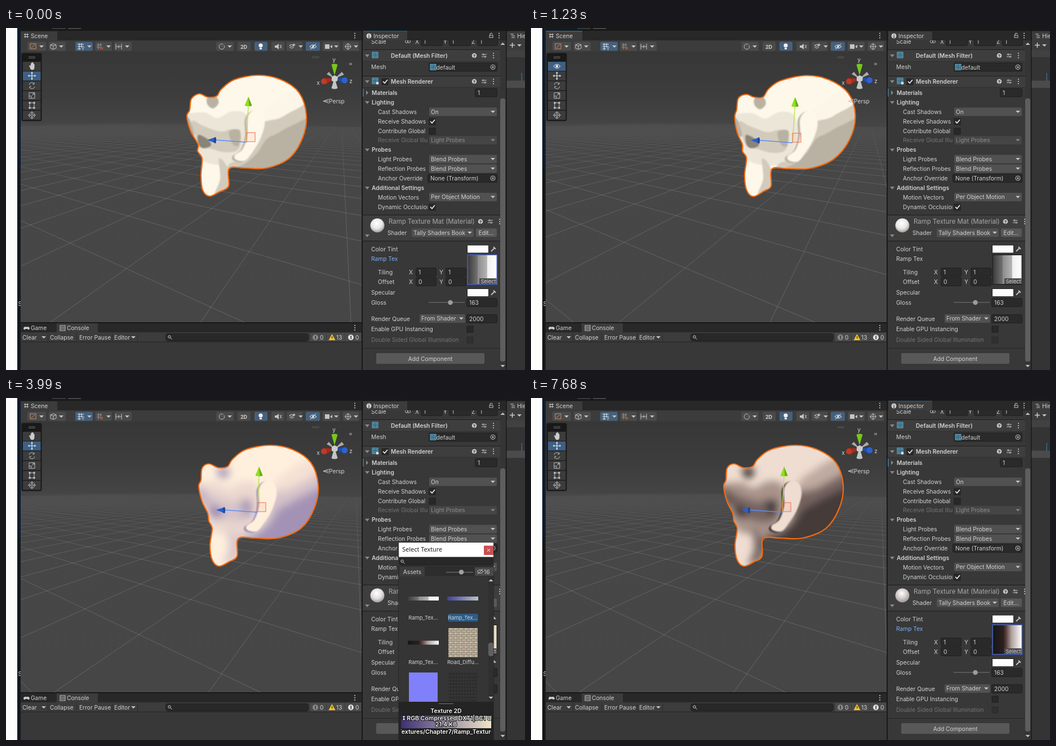
Write an HTML page that moves like this. It is 921 px wide and 608 px high and loops after 8000 ms.

```html
<!DOCTYPE html>
<html lang="en">
<head>
<meta charset="utf-8">
<title>Ramp texture editor</title>
<style>
html,body{margin:0;width:100%;height:100%;overflow:hidden;background:#282828}
svg{display:block;width:921px;height:608px}
text{font-family:Inter,sans-serif;font-size:10.2px;fill:#d2d2d2;white-space:pre}
</style>
</head>
<body>
<svg id="stage" viewBox="0 0 921 608" xmlns="http://www.w3.org/2000/svg"></svg>
<script>
const $ = id => document.getElementById(id);
const rect = (x, y, w, h, fill, more = '') => `<rect x="${x}" y="${y}" width="${w}" height="${h}" fill="${fill}" ${more}/>`;
const text = (x, y, s, more = '') => `<text x="${x}" y="${y + 3.8}" ${more}>${s}</text>`;
const path = (d, color = '#c4c4c4', more = '') => `<path d="${d}" fill="none" stroke="${color}" ${more}/>`;
const solid = (d, color = '#c4c4c4', more = '') => `<path d="${d}" fill="${color}" ${more}/>`;
const circle = (x, y, r, fill, more = '') => `<circle cx="${x}" cy="${y}" r="${r}" fill="${fill}" ${more}/>`;
const down = (x, y) => solid(`M${x - 4} ${y - 2}h8l-4 4z`);
const up = (x, y) => solid(`M${x - 4} ${y + 2}h8l-4-4z`);
const right = (x, y) => solid(`M${x - 2} ${y - 4}v8l4-4z`, '#888');
const fold = (x, y) => solid(`M${x - 4} ${y - 2}h8l-4 5z`, '#888');
const dots = (x, y) => [-4, 0, 4].map(d => circle(x, y + d, 1.1, '#c4c4c4')).join('');
const bold = 'font-weight="600"', dim = 'style="fill:#747474"', mid = 'text-anchor="middle"';
const field = (x, y, w, s) => rect(x + .5, y - 7.5, w, 15, '#2a2a2a', 'stroke="#202020" rx="2"') + text(x + 5, y + .5, s);
const drop = (x, y, w, s, more = '') => rect(x, y - 7.5, w, 15, '#515151', 'rx="2"') + text(x + 3, y, s, more) + down(x + w - 7, y);
const box = (x, y, on) => rect(x - 5, y - 5, 11, 11, '#292929', 'stroke="#1e1e1e"') + (on ? path(`M${x - 3} ${y}l3 3l5-6`, '#f0f0f0', 'stroke-width="1.7"') : '');
const target = (x, y) => circle(x, y, 4, 'none', 'stroke="#c4c4c4"') + circle(x, y, 1.5, '#c4c4c4');
const meshIcon = (x, y) => rect(x - 5, y - 5, 10, 10, '#27566b', 'stroke="#6fb3d2"') + path(`M${x - 5} ${y - 2}h10m-10 4h10m-7-7v10m4-10v10`, '#6fb3d2', 'stroke-width=".8"');
const help = (x, y) => circle(x, y, 4.3, '#c8c8c8') + text(x, y - .3, '?', mid + ' font-weight="700" style="fill:#333;font-size:8px"') +
  path(`M${x + 13} ${y - 2}h9m-9 4h9m-6-6v4m3 0v4`) + dots(x + 34, y);
const lens = (x, y) => circle(x, y - 1, 2.2, 'none', 'stroke="#d0d0d0"') + path(`M${x + 2} ${y + 1}l2.5 2.5`, '#d0d0d0');
const stops = list => list.map(([o, c]) => `<stop offset="${o}" stop-color="${c}"/>`).join('');
const ramps = [
  [[0, '#3c3c3c'], [.34, '#747474'], [.34, '#8c8c8c'], [.66, '#b4b4b4'], [.68, '#f0f0f0'], [1, '#fff']],
  [[0, '#3f2f78'], [.5, '#988ba5'], [1, '#efe5c8']],
  [[0, '#161616'], [.36, '#2b2020'], [.46, '#5b3f3c'], [.65, '#b0a3a1'], [1, '#fff']]
];
const tones = [
  {lit: '#fdf8ea', haze: '#fbf6e8', half: '#ece6d8', mid: '#d2cbbc', low: '#b9b2a3', dark: '#8a8478', blur: .8, ball: '#e8e6e4'},
  {lit: '#fff0dd', haze: '#f5e1d4', half: '#ecd8cf', mid: '#d5c3c9', low: '#a392b5', dark: '#8373a6', blur: 8, ball: '#e2dcdf'},
  {lit: '#efddd1', haze: '#bfaaa0', half: '#a8938a', mid: '#756460', low: '#443a39', dark: '#3f3536', blur: 7, ball: '#cfc5c4'}
];

function defs() {
  return `<defs>
  <linearGradient id="sky" x2="0" y2="1">${stops([[0, '#373737'], [.16, '#3d3d3d'], [.3, '#474747'], [1, '#464646']])}</linearGradient>
  <linearGradient id="fade" gradientUnits="userSpaceOnUse" x1="0" y1="160" x2="0" y2="523">
  <stop offset=".02" stop-color="#fff" stop-opacity="0"/><stop offset=".1" stop-color="#fff" stop-opacity=".05"/><stop offset=".35" stop-color="#fff" stop-opacity=".14"/><stop offset="1" stop-color="#fff" stop-opacity=".17"/></linearGradient>
  <radialGradient id="ball" cx=".45" cy=".35" r=".7"><stop offset="0" stop-color="#fff"/><stop id="ballMid" offset=".55"/><stop offset="1" stop-color="#8f8d8d"/></radialGradient>
  ${ramps.map((r, i) => `<linearGradient id="ramp${i}">${stops(r)}</linearGradient>`).join('')}
  <pattern id="stone" width="9" height="8" patternUnits="userSpaceOnUse">${rect(0, 0, 9, 8, '#b9ad9a') + path('M0 .5h9M0 4.5h9M3 0v4M7 4v4', '#8d8171', 'stroke-width=".9"') + rect(4, 1, 3, 3, '#cdc2af')}</pattern>
  <pattern id="coal" width="5" height="6" patternUnits="userSpaceOnUse">${rect(0, 0, 5, 6, '#303030') + rect(1, 1, 2, 1, '#454545') + rect(3, 4, 1, 1, '#222')}</pattern>
  <filter id="soft" x="-20%" y="-20%" width="140%" height="140%"><feGaussianBlur id="blur" stdDeviation=".8"/></filter>
  <filter id="edge"><feGaussianBlur stdDeviation="1.2"/></filter>
  <clipPath id="view"><rect x="26" y="42" width="605" height="481"/></clipPath>
  <clipPath id="labels"><rect x="636" y="22" width="112" height="586"/></clipPath>
  <clipPath id="body"><rect x="633" y="22" width="244" height="586"/></clipPath>
  <clipPath id="info"><rect x="701" y="541" width="160" height="67"/></clipPath>
  <clipPath id="skin"><path id="skinPath"/></clipPath></defs>`;
}

function toolbar() {
  const on = '#46607c', off = '#4a4a4a';
  const buttons = [[38, 33, off], [76, 30, off], [123, 31, on], [158, 30, off], [192, 31, off], [373, 31, off], [411, 23, off], [441, 23, on], [471, 23, off], [498, 28, off], [532, 25, on], [562, 30, off], [598, 28, off]];
  return rect(26, 22, 605, 20, '#3c3c3c') + buttons.map(([x, w, c]) => rect(x, 24.5, w, 16, c, 'rx="2"')).join('') +
    [63, 98, 148, 182, 215, 397, 523, 586, 621].map(x => down(x, 33)).join('') +
    rect(43, 28, 10, 9, 'none', 'stroke="#c98d6b"') + path('M45 35l6-5', '#c98d6b') +
    path('M84 28l5 2v6l-5 2l-5-2v-6zM79 30l5 2l5-2M84 32v6') +
    path('M127 29h11m-11 4h11m-11 4h6m-3-10v12m4-12v7', '#dfe7ef') + text(134, 36, 'Y', 'style="font-size:8px"') +
    path('M161 30h9m-9 4h9m-6-7v11m4-11v5', '#999') + rect(167, 34, 5, 4, '#9a5440') +
    path('M195 28v10M205 28v10M195 33h10M200 30v6') +
    circle(383, 33, 4.8, 'none', 'stroke="#c4c4c4"') + circle(384.5, 31.5, 3, '#555') + text(422, 33, '2D', mid + ' style="font-size:9px;font-weight:700"') +
    circle(452, 31, 3.6, '#f2f2f2') + rect(450, 35, 4, 3, '#f2f2f2') +
    solid('M477 31h3l4-3v10l-4-3h-3z') + path('M486 30l3 6m0-6l-3 6') +
    path('M503 31l4-2l4 2l-4 2zM503 34l4 2l4-2', '#ccc') + solid('M511 27l1 2l2 1l-2 1l-1 2l-1-2l-2-1l2-1z') +
    path('M539 33q6-6 12 0q-6 6-12 0M540 38l10-10', '#eee') + circle(545, 33, 1.8, '#eee') +
    rect(566, 29, 8, 8, '#c4c4c4') + solid('M575 33l4-3v6z') +
    circle(607, 33, 4.5, 'none', 'stroke="#c4c4c4"') + path('M607 27v12m-6-6h12');
}

function tools() {
  const y = [68, 85.2, 102.6, 120, 137.5, 155];
  return rect(27.5, 44.5, 36, 121, '#191919', 'rx="3"') + path('M40 51h12m-12 2.5h12', '#666') +
    y.map((v, i) => rect(30, v - 8, 31.5, 16.2, '#3c3c3c', `id="tool${i}"`)).join('') +
    `<g id="hand">${solid('M41 67l2-1l1 2v-5q1-1 1.6 0v-2q1-1 1.7 0v1q1-1 1.6 0v2q1-.6 1.6.4v5q0 5-4 5q-3 0-4-4z', '#ccc')}</g>` +
    `<g id="eye">${path('M40 68q6-7 12 0q-6 7-12 0', '#eee') + circle(46, 68, 2.2, '#eee')}</g>` +
    path('M40 85h12M46 79v12', '#dfe7ef', 'stroke-width="1.2"') + solid('M38.5 85l3-2v4zM53.5 85l-3-2v4zM46 77.5l-2 3h4zM46 92.5l-2-3h4z', '#dfe7ef') +
    path('M41 101a5 5 0 0 1 9-2m1 5a5 5 0 0 1-9 2m8-9v3h-3m-5 7v-3h3', '#bbb') +
    path('M41 115h10v10h-10zM41 121h4v4M46 120l4-4m-3 0h3v3', '#bbb') +
    path('M42 133h8v9h-8z', '#bbb') + [41, 49].map(x => [132, 141].map(v => rect(x - .5, v - .5, 3, 3, '#ccc')).join('')).join('') +
    circle(46, 155, 5, 'none', 'stroke="#bbb"') + path('M46 148v14m-7-7h14', '#bbb') + circle(46, 155, 2, '#3c3c3c', 'stroke="#bbb"');
}

function compass() {
  return path('M543 51h13m-13 2h13', '#555') + path('M609 63h5m-5 2h5', '#aaa') +
    solid('M583 90l-14-8l4-4zM583 90l13-12l4 5z', '#a8aaab') + solid('M583 88l-5.5 19q5.5 3 11 0z', '#c3c5c6') +
    solid('M583 84L577.5 65q5.5-3 11 0z', '#76c81b') + '<g id="axisX">' + solid('M583 90l-21-1l4 12z', '#a92c1c') + circle(564, 95, 5, '#bf3c27') + '</g><g id="axisZ">' +
    solid('M583 90l20-3l-3 12z', '#204ea8') + circle(601, 93, 5.2, '#2d62cf') + '</g>' + solid('M578 87l5-3l6 3l-1 7l-5 2l-5-2z', '#c9cccd') +
    text(582, 56, 'y', mid) + text(554, 97, 'x', mid + ' id="nameX"') + text(612, 94, 'z', mid) +
    path('M573 126.5l-10 3.5l10 3.5M563 130h10', '#c8c8c8') + text(573, 130, 'Persp');
}

function inspector() {
  const labels = [[660, 149, 'Cast Shadows'], [660, 166, 'Receive Shadows'], [660, 183, 'Contribute Global'], [660, 199.5, 'Receive Global Illumination', dim],
    [660, 233, 'Light Probes'], [660, 250, 'Reflection Probes'], [660, 267, 'Anchor Override'], [660, 301, 'Motion Vectors'], [660, 318, 'Dynamic Occlusion'], [648, 24, 'Scale'], [648, 69.5, 'Mesh']];
  const frame = rect(633, 5, 254, 17, '#282828') + rect(634, 6, 78, 17, '#3c3c3c') + rect(633, 22, 254, 586, '#383838') +
    circle(644, 14, 4.5, '#ccc') + text(644, 14, 'i', mid + ' style="fill:#333;font-weight:700;font-size:8px"') + text(652, 14, 'Inspector') +
    rect(858, 13, 6, 4, 'none', 'stroke="#c4c4c4"') + path('M859 13v-3q2-2 4 0v1') + dots(875, 13.5) + rect(634, 5, 78, 1, '#2c5d87', 'id="focusB"');
  let b = ['X', 'Y', 'Z'].map((a, i) => text(726 + i * 50, 24, a) + field(736 + i * 50, 24, i < 2 ? 38 : 36, '1')).join('') +
    circle(711, 24, 2.5, 'none', 'stroke="#bbb"') + circle(715, 24, 2.5, 'none', 'stroke="#bbb"');
  for (const [y, h] of [[38, 21], [85, 20]]) b += rect(633, y, 244, h, '#3e3e3e') + rect(633, y, 244, 1, '#1f1f1f') + rect(633, y + h, 244, 1, '#303030');
  b += fold(641, 49) + meshIcon(655, 48) + text(683, 49, 'Default (Mesh Filter)', bold) + help(831, 49) +
    field(750, 69.5, 121, '   default') + meshIcon(758, 69.5) + target(864, 69.5) +
    fold(641, 95) + meshIcon(655, 94) + circle(659, 98, 2.5, '#cfdce2') + box(672, 95, 1) + text(683, 95, 'Mesh Renderer', bold) + help(831, 95) +
    rect(633, 108, 1.5, 14, '#3c83ad') + right(641, 115) + field(832, 115, 39, '1');
  for (const [y, n] of [[115, 'Materials'], [132, 'Lighting'], [216.5, 'Probes'], [284, 'Additional Settings']]) b += (y > 115 ? fold(641, y) : '') + text(649, y, n, bold);
  b += drop(751, 149, 120, 'On') + box(756, 166, 1) + box(756, 183) + `<g opacity=".55">${drop(751, 199.5, 120, 'Light Probes')}</g>` +
    drop(751, 233, 120, 'Blend Probes') + drop(751, 250, 120, 'Blend Probes') + field(748, 267, 123, 'None (Transform)') + target(864, 267) +
    drop(751, 300.5, 120, 'Per Object Motion') + box(756, 318, 1) +
    rect(633, 332, 244, 46, '#3e3e3e') + rect(633, 332, 244, 1, '#1d1d1d') + rect(633, 378, 244, 1.5, '#252525') + circle(659, 351, 12.5, 'url(#ball)') + fold(641, 369) +
    text(679, 344, 'Ramp Texture Mat (Material)', 'style="font-size:11.4px;fill:#aaa"') + help(842, 344) + text(677, 364, 'Shader') + drop(720, 364, 110, 'Tally Shaders Book') +
    rect(834, 356.5, 37, 15, '#585858', 'rx="2"') + text(852, 364, 'Edit...', mid) +
    text(648, 393.5, 'Color Tint') + text(648, 410.5, 'Ramp Tex', 'id="rampName"') + text(660, 434, 'Tiling') + text(660, 451, 'Offset');
  for (const y of [393, 470.5]) b += rect(818.5, y - 7, 38, 14, '#fdfdfd', 'stroke="#222"') + path(`M861 ${y + 4}l6-6m-2-2l4 4`, '#c4c4c4', 'stroke-width="1.8"');
  [434, 451].forEach((y, i) => { b += text(715, y, 'X') + field(727, y, 36, 1 - i) + text(769, y, 'Y') + field(780, y, 36, 1 - i); });
  b += rect(818.5, 402.5, 53.5, 54, '#222', 'id="thumbEdge"') + rect(820, 404, 50.5, 51, 'url(#ramp0)', 'id="thumb"') + rect(840, 445, 30.5, 10, '#4b4b4b') + text(856, 450.5, 'Select', mid + ' style="font-size:9.2px"') +
    text(648, 470.5, 'Specular') + text(648, 488, 'Gloss') + rect(750, 487, 64, 1.5, '#626262') + circle(788.5, 488, 4.3, '#9c9c9c') + field(817, 488, 54, '163') +
    text(648, 517, 'Render Queue') + drop(734, 516.5, 81, 'From Shader') + field(817, 517, 54, '2000') + text(648, 535, 'Enable GPU Instancing') + box(823, 535) +
    text(648, 554, 'Double Sided Global Illumination', dim) + `<g opacity=".5">${box(823, 554)}</g>` + rect(633, 569, 244, 1, '#262626') +
    rect(657, 578, 192, 19, '#585858', 'rx="2"') + text(753, 588, 'Add Component', mid);
  return frame + `<g clip-path="url(#body)">${b}</g><g clip-path="url(#labels)">${labels.map(a => text(...a)).join('')}</g>` +
    rect(877, 22, 10, 586, '#353535') + rect(877, 125, 9, 468, '#5e5e5e', 'rx="4"') + up(881.5, 28) + down(881.5, 601) + rect(887, 0, 1.5, 608, '#191919');
}

function picker() {
  const small = 'style="font-size:9.3px"';
  const thumb = (i, x, y) => rect(x - 27.5, y - 3.5, 55, 7, `url(#ramp${i})`) + rect(x - 27.5, y - 3.5, 55, 7, '#3e6fd0', `id="tint${i}" opacity=".3"`) +
    rect(x - 26, y + 27, 53, 14, '#2c5d87', `id="pick${i}" rx="2"`) + text(x, y + 34, 'Ramp_Tex...', mid + ' ' + small);
  const info = (y, s, x = 781, anchor = mid) => text(x, y, s, anchor + ' style="font-size:10.5px;font-weight:600;fill:#fff;stroke:#111;stroke-width:2px;paint-order:stroke"');
  return rect(696, 256, 170, 360, '#222', 'opacity=".6"') + rect(697, 257, 168, 351, '#353535') + rect(697, 257, 168, 25.5, '#fff') +
    text(703, 269.5, 'Select Texture', 'style="font-family:\'Open Sans\',sans-serif;font-size:11px;fill:#111"') + rect(848, 262.5, 17, 16.5, '#c75050', 'id="close"') + path('M854 268l5 5m0-5l-5 5', '#fff') +
    rect(698.5, 284, 165, 13, '#282828', 'id="search" rx="3"') + lens(703, 291) + rect(710, 286, 1, 9, '#ddd', 'id="caret"') +
    rect(697, 299, 168, 17.5, '#2d2d2d') + rect(698, 300, 45, 17, '#3c3c3c') + text(721, 309.5, 'Assets', mid) + rect(781, 309, 48, 1.5, '#666') + circle(808, 309.5, 4.3, '#a0a0a0') +
    rect(832, 301, 33, 15, '#4a4a4a') + path('M836 308.5q5-6 11 0q-5 6-11 0M837 313l9-9', '#ccc') + text(848, 309, '16') +
    rect(856, 317, 9, 223, '#303030') + rect(856, 435, 9, 24, '#606060', 'rx="4"') + up(860.5, 324) + down(860.5, 533) +
    thumb(0, 740.5, 356.5) + thumb(1, 810.5, 356.5) + thumb(2, 740.5, 435) + rect(785, 409, 52, 52, 'url(#stone)') + text(811, 469.5, 'Road_Diffu...', mid + ' ' + small) +
    rect(715, 488, 51, 52, '#8080fb') + rect(785, 488, 52, 52, 'url(#coal)') +
    rect(697, 540, 168, 68, '#242424') + path('M768 543.5h26', '#777') + `<g clip-path="url(#info)">${rect(701, 565, 160, 22, 'url(#ramp0)', 'id="preview"')}${info(556, 'Texture 2D')}${info(569, '⭥ RGB Compressed DXT1|BC1 UNorm', 703, '')}${info(580.5, '21.4 KB')}${info(593, 'Textures/Chapter7/Ramp_Texture')}</g>`;
}

function build() {
  const shades = shapes.map((s, i) => `<path id="shade${i}"/>`).join('');
  $('stage').innerHTML = defs() + rect(0, 0, 921, 608, '#191919') + rect(0, 0, 20, 608, '#fdfefb') + rect(20, 0, 6, 608, '#0f1c2b') + rect(20, 250, 5, 358, '#151719') +
    text(21.5, 490, 'S') + rect(26, 5, 605, 17, '#282828') + rect(26, 6, 65, 17, '#3c3c3c') + rect(26, 5, 65, 1.3, '#35699c', 'id="focusA"') + rect(82, 0, 24, 1.5, '#444') + rect(110, 0, 23, 1.5, '#555') +
    path('M32 11.5h8m-8 4h8m-6-6v8m4-8v8', '#ccc') + text(44, 14, 'Scene') + dots(619, 13.5) + toolbar() +
    `<g clip-path="url(#view)">${rect(26, 42, 605, 481, 'url(#sky)')}<path id="grid" fill="none" stroke="url(#fade)"/>
    <path id="coat"/><g clip-path="url(#skin)"><g id="shades" filter="url(#soft)">${shades}</g><path id="earShade" filter="url(#edge)"/><path id="ear" filter="url(#edge)"/></g>
    <path id="rim" fill="none" stroke="#f5690f" stroke-width="2.2"/><g id="arrows"></g>${compass()}${tools()}</g>` +
    rect(26, 525, 605, 16, '#282828') + rect(90, 525, 73, 16, '#3c3c3c') + solid('M31 534q1-4 5.5-2.5q4.5-1.5 5.5 2.5q-1 4-4 1h-3q-3 3-4-1', '#ccc') + text(44, 533.5, 'Game') +
    rect(96, 529, 9, 9, 'none', 'stroke="#ccc"') + path('M97 532h7m-7 3h7', '#ccc') + text(108, 533.5, 'Console') + dots(619, 533) +
    rect(26, 541, 605, 17, '#3c3c3c') + rect(26, 558, 605, 50, '#383838') + rect(26, 557.5, 605, 1, '#232323') +
    [[29, 'Clear'], [78, 'Collapse'], [130, 'Error Pause'], [192, 'Editor']].map(([x, s]) => text(x, 550.5, s)).join('') + down(67, 550) + down(226, 550) +
    [74, 125, 188, 233].map(x => rect(x, 542, 1, 15, '#2b2b2b')).join('') + rect(283.5, 543.5, 253, 13, '#282828', 'rx="4" stroke="#202020"') + lens(290, 550) +
    rect(540, 542, 28, 15, '#4a4a4a') + circle(549, 550, 5, '#888') + rect(548.5, 547, 1.5, 6, '#333') + text(557, 550.5, '0') +
    rect(569, 542, 32, 15, '#4a4a4a') + solid('M578.5 544l6 11h-12z', '#f8c021') + rect(578, 548, 1.3, 4, '#333') + text(586, 550.5, '13') +
    rect(602, 542, 28, 15, '#4a4a4a') + circle(612, 550, 5, '#ddd') + rect(611.5, 547, 1.5, 6, '#333') + text(620, 550.5, '0') + inspector() +
    rect(888.5, 5, 33, 17, '#282828') + rect(889, 6, 33, 17, '#3c3c3c') + path('M895 11h6m-4 3h6m-6 3h6', '#ccc') + text(907, 14, 'Hierarchy') +
    rect(888.5, 22, 33, 18, '#3c3c3c') + path('M894 30.5h9m-4.5-4.5v9', '#ccc', 'stroke-width="1.5"') + down(911, 31) + rect(888.5, 40, 33, 568, '#343434') + rect(888.5, 40, 33, 12, '#414141') +
    rect(888.5, 93.5, 33, 13, '#4b4b4b') + rect(914.5, 80, 1.5, 14, '#2c6f8f') + `<g id="picker">${picker()}</g>`;
}

// Outline of the head in four camera poses, joined by a closed spline.
const shift = (a, dx, dy = 0) => a.map((v, i) => v + (i % 2 ? dy : dx));
const headA = [343,117,329,126,326,146,321,157,328,184,341,207,340,219,348,232,346,262,349,288,361,299,379,291,395,281,396,250,425,249,462,249,502,232,526,196,533,155,520,115,488,92,448,84,405,92,382,109,374,121,358,123];
const headB = [392,115,375,126,368,145,357,158,363,188,379,212,391,222,396,233,389,268,392,298,404,308,430,299,448,290,448,260,480,263,528,261,572,240,599,200,606,158,592,113,555,86,505,76,458,83,423,103,411,126,406,119];
const headC = [404,119,388,125,384,145,381,160,384,188,392,208,391,220,399,231,396,262,400,290,412,300,432,288,442,281,443,251,470,251,508,250,550,235,584,200,597,155,585,117,548,92,508,85,462,95,442,107,430,124,415,122];
const headD = [360,117,348,125,346,146,342,157,348,184,358,205,360,219,366,232,362,262,366,288,378,299,396,291,410,281,412,250,442,249,482,249,523,232,547,196,554,155,541,115,509,92,469,84,425,92,402,109,393,122,377,124];
const earA = [440,146,455,152,459,172,450,200,436,222,424,236,408,234,406,226,420,215,428,190,428,160];
const earB = [456,145,474,152,478,175,470,215,458,244,444,248,434,240,437,215,432,192,430,168,438,152];
const heads = [headA, headB, headC, headD], ears = [earA, earB, shift(earA, 78, 2), shift(earA, 21, 1)];
// tone, points, then the offset in each later pose
const shapes = [
  ['haze', [570,88,508,112,476,132,455,150,440,200,570,220], [66,-4], [66,0], [21,0]],
  ['half', [310,160,350,150,375,160,402,148,428,156,430,200,408,240,352,238,330,206], [34,0], [60,2], [20,0]],
  ['mid', [570,122,512,146,486,160,460,166,448,172,440,215,420,234,396,242,390,268,470,280,570,215], [66,-3], [66,0], [21,0]],
  ['low', [570,148,510,172,482,187,462,198,446,222,426,240,402,255,420,276,500,280,570,200], [66,2], [65,0], [21,0]],
  ['mid', [330,166,350,174,380,184,402,180,417,190,412,216,390,221,365,215,342,206], [28,-2], [58,2], [21,0]],
  ['dark', [341,190,357,197,364,208,352,214,342,208], [28,-8], [60,0], [21,0]],
  ['low', [396,184,415,182,413,208,402,206], [26,-6], [62,2], [21,0]],
  ['low', [358,123,373,122,377,134,367,143,357,135], [39,-1], [60,2], [19,1]],
  ['mid', [378,232,393,248,397,282,382,294,370,296,380,268], [51,8], [48,0], [16,0]],
  ['low', [318,157,327,164,334,190,326,188], [35,2], [60,2], [21,0]]
];
const rig = [ // yaw, origin, up tip, left tip, red reach
  [31.6, 427, 203, 430, 122, 357, 199, 0], [50, 480, 209, 484, 129, 413, 203, 32],
  [30, 482, 205, 488, 124, 407, 200, 0], [34, 446, 203, 449, 122, 373, 199, 0]];
const keys = [540, 810, 1080, 1380];

const mix = (a, b, u) => a.map((v, i) => v + (b[i] - v) * u);
function spline(p) {
  const n = p.length / 2, at = i => { i = (i + n) % n; return [p[2 * i], p[2 * i + 1]]; };
  let d = 'M' + at(0);
  for (let i = 0; i < n; i++) {
    const [a, b, c, e] = [at(i - 1), at(i), at(i + 1), at(i + 2)];
    d += `C${[0, 1].map(k => b[k] + (c[k] - a[k]) / 6)} ${[0, 1].map(k => c[k] - (e[k] - b[k]) / 6)} ${c}`;
  }
  return d + 'Z';
}
function poseAt(t) {
  if (t <= keys[0]) return [0, 0, 0];
  if (t >= keys[3]) return [3, 3, 0];
  const i = keys.findIndex(k => k > t) - 1, u = (t - keys[i]) / (keys[i + 1] - keys[i]);
  return [i, i + 1, u * u * (3 - 2 * u)];
}
function gridPath(yaw, x) {
  const a = yaw * Math.PI / 180, p = .2915, sp = Math.sin(p), cp = Math.cos(p);
  const d1 = [Math.sin(a), Math.cos(a)], d2 = [-d1[1], d1[0]], m = [(x - 328) / 416 * 2.69, 2.5];
  const screen = (r, w) => { const z = w * cp + sp; return `${(328 + 416 * r / z).toFixed(1)} ${(283 + 416 * (cp - w * sp) / z).toFixed(1)}`; };
  let d = '';
  for (const [dir, n, o] of [[d1, d2, .337], [d2, d1, -1.52]]) {
    const base = m[0] * n[0] + m[1] * n[1] + o;
    for (let k = -45; k <= 45; k++) {
      const c = base + k * .65, start = (.05 - n[1] * c) / dir[1];
      d += 'M' + screen(n[0] * c + dir[0] * start, .05) + 'L' + screen(n[0] * c + dir[0] * 80, n[1] * c + dir[1] * 80);
    }
  }
  return d;
}
function arrows([, x, y, ux, uy, lx, ly, red]) {
  const k = red / 32;
  return path(`M${x} ${y}L${ux} ${uy + 15}`, '#b5e34a', 'stroke-width="1.3"') + solid(`M${ux} ${uy}l6.5 16q-6.5 2.5-13 0z`, '#8fe01c') + solid(`M${ux} ${uy}l6.5 16q-3 1-5 1z`, '#6cab18') +
    path(`M${x} ${y}L${lx + 14} ${ly}`, '#5d8df2', 'stroke-width="1.3"') + solid(`M${lx} ${ly}l15-5q2 5 0 11z`, '#2d5fcb') + solid(`M${lx + 12} ${ly - 4}l3-1q2 5 0 11l-3-1z`, '#234894') +
    rect(x, y - 17, 15, 16, '#f0563a', `fill-opacity="${.08 + .3 * k}" stroke="#f26a55"`) +
    (k > .15 ? `<g opacity="${k}">${rect(x - 11, y - 16, 11, 15, '#4a7cf0', 'fill-opacity=".4" stroke="#4a7cf0"') + path(`M${x - 10} ${y + 1}l12-2l11 2l-12 2z`, '#8fe01c') + path(`M${x} ${y - 1}L${x + red - 14} ${y - 5}`, '#e06a50') + solid(`M${x + red} ${y - 6}l-13-5q-2 5 0 11z`, '#d23c22')}</g>` : '');
}

const set = (id, o) => { for (const k in o) $(id).setAttribute(k, o[k]); };
const show = (id, on) => set(id, {visibility: on ? 'inherit' : 'hidden'});
let last = -1;
function draw(now) {
  const t = Math.floor(now % 8000 / 30) * 30;
  if (t !== last) update(last = t);
  requestAnimationFrame(draw);
}
function update(t) {
  const [i, j, u] = poseAt(t), state = t < 3990 ? 0 : t < 5640 ? 1 : 2, c = tones[state];
  const skin = spline(mix(heads[i], heads[j], u)), pose = mix(rig[i], rig[j], u), ear = spline(mix(ears[i], ears[j], u));
  set('skinPath', {d: skin}); set('coat', {d: skin, fill: c.lit}); set('rim', {d: skin}); set('blur', {stdDeviation: c.blur});
  shapes.forEach((s, n) => {
    const move = [[0, 0], ...s.slice(2)], [dx, dy] = mix(move[i], move[j], u);
    set('shade' + n, {d: spline(shift(s[1], dx, dy)), fill: c[s[0]]});
  });
  set('ear', {d: ear, fill: c.lit}); set('earShade', {d: ear, fill: c.low, transform: 'translate(-4 2)'});
  set('ballMid', {'stop-color': c.ball});
  set('grid', {d: gridPath(pose[0], pose[1])});
  $('arrows').innerHTML = arrows(pose);

  const turn = pose[7] / 32;
  set('axisX', {transform: `translate(${turn} ${-2 * turn})`}); set('axisZ', {transform: `translate(0 ${3 * turn})`});
  set('nameX', {opacity: 1 - .7 * turn});
  const orbit = t >= 570 && t < 1350;
  set('tool0', {fill: orbit ? '#3f5f83' : '#3c3c3c'}); set('tool1', {fill: orbit ? '#3c3c3c' : '#3f5f83'});
  show('eye', orbit); show('hand', !orbit);

  const inFocus = t < 570 || t >= 7560;
  show('focusA', t >= 570 && t < 2400); show('focusB', inFocus);
  $('rampName').style.fill = inFocus ? '#7fb0f5' : '#d2d2d2';
  set('thumb', {fill: `url(#ramp${state})`}); set('thumbEdge', {fill: inFocus ? '#4560c4' : '#222'});

  const open = t >= 2400 && t < 7560, fade = t < 3000 ? Math.min(1, (t - 2370) / 210) : Math.min(1, (7560 - t) / 150);
  const slide = t < 3210 ? 1.03 : Math.max(0, 1 - (t - 3210) / 120), s = slide > 1 ? slide : slide * slide * (3 - 2 * slide);
  show('picker', open);
  if (!open) return;
  set('picker', {opacity: fade, transform: `translate(${147 * s} ${12 * s})`});
  for (let n = 0; n < 3; n++) { show('pick' + n, n === state); show('tint' + n, n === state); }
  set('preview', {fill: `url(#ramp${state})`});
  set('close', {fill: t >= 6420 ? '#e04343' : '#c75050'});
  set('search', {stroke: state ? '#202020' : '#3a79bb'}); show('caret', !state);
}
build();
update(0);
requestAnimationFrame(draw);
</script>
</body>
</html>
```
